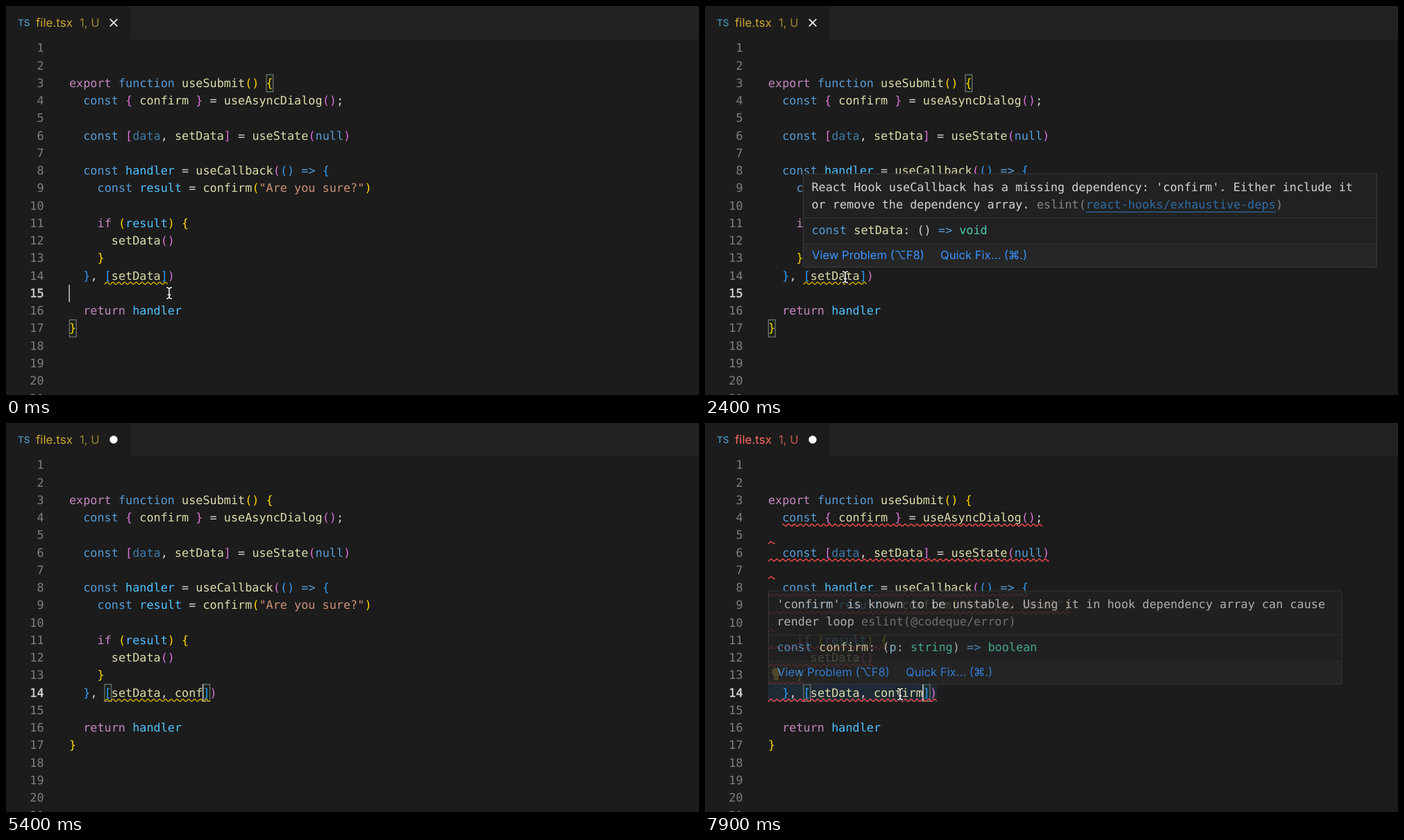
An HTML page that plays this animation: 998 px wide and 561 px high, repeating every 8 s.

```html
<!DOCTYPE html>
<html lang="en">
<head>
<meta charset="utf-8">
<title>Editor</title>
<style>
html, body { margin: 0; width: 100%; height: 100%; overflow: hidden; background: #1c1c1c; }
svg { display: block; width: 998px; height: 561px; }
text { white-space: pre; text-rendering: geometricPrecision; }
.code { font: 16.826px "DejaVu Sans Mono", monospace; }
.ui { font-family: Inter, "DejaVu Sans", sans-serif; }
.num { fill: #7e7e7e; text-anchor: end; }
.num.on { fill: #d0d0d0; stroke: #d0d0d0; stroke-width: .5px; }
</style>
</head>
<body>
<svg id="stage" viewBox="0 0 998 561" xmlns="http://www.w3.org/2000/svg"></svg>
<script>
const LOOP = 8000, STEP = 100;
const CHAR = 10.13, LEFT = 91, ROW = 25.26;
const CLICK = 3500, ERRORS = 6100;

// First letter of each code part picks its colour.
const COLORS = {
  p: '#c586c0', b: '#569cd6', f: '#dcdcaa', w: '#d4d4d4', y: '#ffd700', o: '#da70d6',
  u: '#2f9bf5', v: '#4fc1ff', s: '#ce9178', d: '#3d7ba6', t: '#4ec9b0', n: '#9cdcfe',
  g: '#858585', l: '#2f6ca6'
};

const CODE = {
  3: 'pexport |bfunction |fuseSubmit|y() {',
  4: 'w  |bconst |o{ |fconfirm|o }|w = |fuseAsyncDialog|o()|w;',
  6: 'w  |bconst |o[|ddata|w, |fsetData|o]|w = |fuseState|o(|bnull|o)',
  8: 'w  |bconst |vhandler|w = |fuseCallback|o(|u() |b=>|u {',
  9: 'w    |bconst |vresult|w = |fconfirm|y(|s"Are you sure?"|y)',
  11: 'w    |pif |y(|vresult|y) {',
  12: 'w      |fsetData|o()',
  13: 'w    |y}',
  16: 'w  |preturn |vhandler',
  17: 'y}'
};

// Red underline: line, first column, last column.
const RED = [[4, 2, 39], [5, 0, 1], [6, 0, 40], [7, 0, 1], [8, 0, 37], [9, 0, 43],
  [10, 0, 1], [11, 0, 17], [12, 0, 15], [13, 0, 5], [14, 0, 24]];

const TYPED = ', confirm';
const KEYS = [4000, 4200, 4900, 5100, 5200, 5400, 5500, 5700, 5900];

const POINTER = [[0, 235, 414], [800, 235, 414], [1100, 202, 391], [2900, 202, 391],
  [3300, 225, 391], [6900, 225, 391], [7500, 281, 391], [8000, 281, 391]];

const HOVERS = [
  { from: 1450, to: CLICK, x: 141.5, w: 826, lines: [
    "wReact Hook useCallback has a missing dependency: 'confirm'. Either include it",
    'wor remove the dependency array. |geslint(|lreact-hooks/exhaustive-deps|g)',
    'bconst |fsetData|w: () |b=>|t void'], link: [39, 66] },
  { from: 7820, to: LOOP, x: 91.5, w: 825.5, lines: [
    "w'confirm' is known to be unstable. Using it in hook dependency array can cause",
    'wrender loop |geslint(@codeque/error)',
    'bconst |fconfirm|w: (|np|w: |tstring|w) |b=>|t boolean'] }
];

const base = n => 66.3 + ROW * (n - 1);
const colX = c => LEFT + c * CHAR;
const rect = (x, y, w, h, fill, more = '') =>
  `<rect x="${x}" y="${y}" width="${w}" height="${h}" fill="${fill}" ${more}/>`;
const path = (d, color, width, more = '') =>
  `<path d="${d}" fill="none" stroke="${color}" stroke-width="${width}" ${more}/>`;
const label = (x, y, size, fill, str, more = '') =>
  `<text class="ui" x="${x}" y="${y}" font-size="${size}" fill="${fill}" ${more}>${str}</text>`;

function code(parts, x, y) {
  let col = 0;
  return parts.split('|').map(part => {
    const str = part.slice(1), at = x + col * CHAR;
    col += str.length;
    if (!str.trim()) return '';
    const safe = str.replace(/>/g, '&gt;');
    return `<text class="code" x="${at}" y="${y}" fill="${COLORS[part[0]]}">${safe}</text>`;
  }).join('');
}

function squiggle(line, from, to, color) {
  const end = colX(to), y = base(line) + 5.2;
  let d = '';
  for (let x = colX(from); x <= end; x += .7) {
    const wave = 1.6 * Math.cos((x - LEFT) / 8.4 * 2 * Math.PI);
    d += `${d ? 'L' : 'M'}${x.toFixed(1)} ${(y + wave).toFixed(2)}`;
  }
  return path(d, color, 1.4);
}

const bracketBox = (line, col) => rect(colX(col) + .3, base(line) - 17.8, CHAR - .3, 24.6,
  'rgba(0,100,0,.1)', 'stroke="#888" stroke-width="1"');

function tab(dirty, red) {
  const mark = dirty
    ? '<circle cx="155" cy="24" r="5.7" fill="#fff"/>'
    : path('M149.8 18.8l10.6 10.6m0-10.6l-10.6 10.6', '#f0f0f0', 1.7);
  return rect(179, 0, 819, 48, '#222') +
    label(17, 28.6, 13.5, '#4a94bd', 'TS', 'font-weight="500"') +
    label(43, 30, 17, red ? '#f5695f' : '#cba52e', 'file.tsx') +
    label(106, 30, 16.6, red ? '#c4574f' : '#a0852d', '1, U') + mark;
}

function hover(h, t) {
  if (t < h.from || t >= h.to) return '';
  const alpha = Math.min(1, (t - h.from) / 100);
  const x = h.x + 12, [a, b] = h.link || [];
  const rule = y => rect(h.x, y, h.w, 1, '#333');
  return `<g opacity="${alpha}">` +
    rect(h.x, 242, h.w, 134.5, '#212121') + rect(h.x, 343, h.w, 33.5, '#262626') +
    rule(305) + rule(342.5) +
    rect(h.x, 242, h.w, 134.5, 'none', 'stroke="#3d3d3d" rx="1"') +
    h.lines.map((str, i) => code(str, x, [267.2, 292.4, 329.4][i])).join('') +
    (h.link ? rect(x + a * CHAR, 296.5, (b - a) * CHAR, 1.2, COLORS.l) : '') +
    label(x + .5, 365.4, 16.6, '#3794ff', 'View Problem (⌥F8)') +
    label(x + 185.5, 365.4, 16.6, '#3794ff', 'Quick Fix... (⌘.)') + '</g>';
}

function pointer(t) {
  if (t >= KEYS[0] && t < 6900) return '';
  const i = POINTER.findIndex(p => p[0] > t);
  const [t0, x0, y0] = POINTER[i - 1], [t1, x1, y1] = POINTER[i];
  const k = (t - t0) / (t1 - t0), e = k * k * (3 - 2 * k);
  const x = x0 + (x1 - x0) * e, y = y0 + (y1 - y0) * e;
  const beam = 'M-4-8q4 0 4 3V5q0 3-4 3M4-8q-4 0-4 3M4 8q-4 0-4-3M-2.5 2.5h5';
  const ring = (r, color, w) => `<circle r="${r}" fill="none" stroke="${color}" stroke-width="${w}"/>`;
  const click = t >= CLICK - 100 && t < CLICK
    ? ring(14, '#141414', 5) + ring(15.8, '#f2f2f2', 1.5) + ring(12.2, '#e0e0e0', 1.3) : '';
  return `<g transform="translate(${x} ${y})">${click}` +
    path(beam, '#111', 3.6, 'stroke-linecap="round"') + path(beam, '#fff', 1.5) + '</g>';
}

function caret(t, line, col, since) {
  return (t - since) % 1000 < 500 ? rect(colX(col) - .6, base(line) - 17.9, 1.5, 25, '#c4c4c2') : '';
}

const bulb = '<circle cx="102.5" cy="359.3" r="6.3" fill="#fc3"/>' +
  '<path d="M99 363h7v5.5q0 2.3-2 2.3h-3q-2 0-2-2.3z" fill="#fc3"/>' +
  rect(99, 366, 7, 1, '#5a4a18');

const fixedCode = Object.entries(CODE).map(([n, str]) => code(str, LEFT, base(n))).join('');

function draw(t) {
  const count = KEYS.filter(k => k <= t).length;
  const clicked = t >= CLICK, red = t >= ERRORS;
  const line = clicked ? 14 : 15, end = 13 + count;
  const typed = TYPED.slice(0, count);
  let out = tab(count > 0, red);

  for (let n = 1; n <= 21; n++)
    out += `<text class="code num${n === line ? ' on' : ''}" x="54.6" y="${base(n)}">${n}</text>`;

  if (t >= 7800) out += rect(LEFT, base(14) - 18, 24 * CHAR, 25.2, '#1e2a36');
  out += clicked ? bracketBox(14, 5) + bracketBox(14, end) : bracketBox(3, 28) + bracketBox(17, 0);
  out += fixedCode;
  out += code(`w  |u}|w, |u[|fsetData|w${typed.slice(0, 2)}|f${typed.slice(2)}|u]|o)`, LEFT, base(14));
  out += red ? RED.map(r => squiggle(...r, '#f14c4c')).join('') + bulb
    : squiggle(14, 5, end + 1, '#cca700');
  out += caret(t, line, clicked ? end : 0, count ? KEYS[count - 1] : clicked ? CLICK : -100);
  out += HOVERS.map(h => hover(h, t)).join('') + pointer(t);
  return out;
}

const stage = document.getElementById('stage');
const start = performance.now();
let shown = -1;

function tick(now) {
  const step = Math.floor((Math.max(0, now - start) % LOOP) / STEP);
  if (step !== shown) {
    shown = step;
    stage.innerHTML = draw(step * STEP);
  }
  requestAnimationFrame(tick);
}
tick(start);
</script>
</body>
</html>
```
